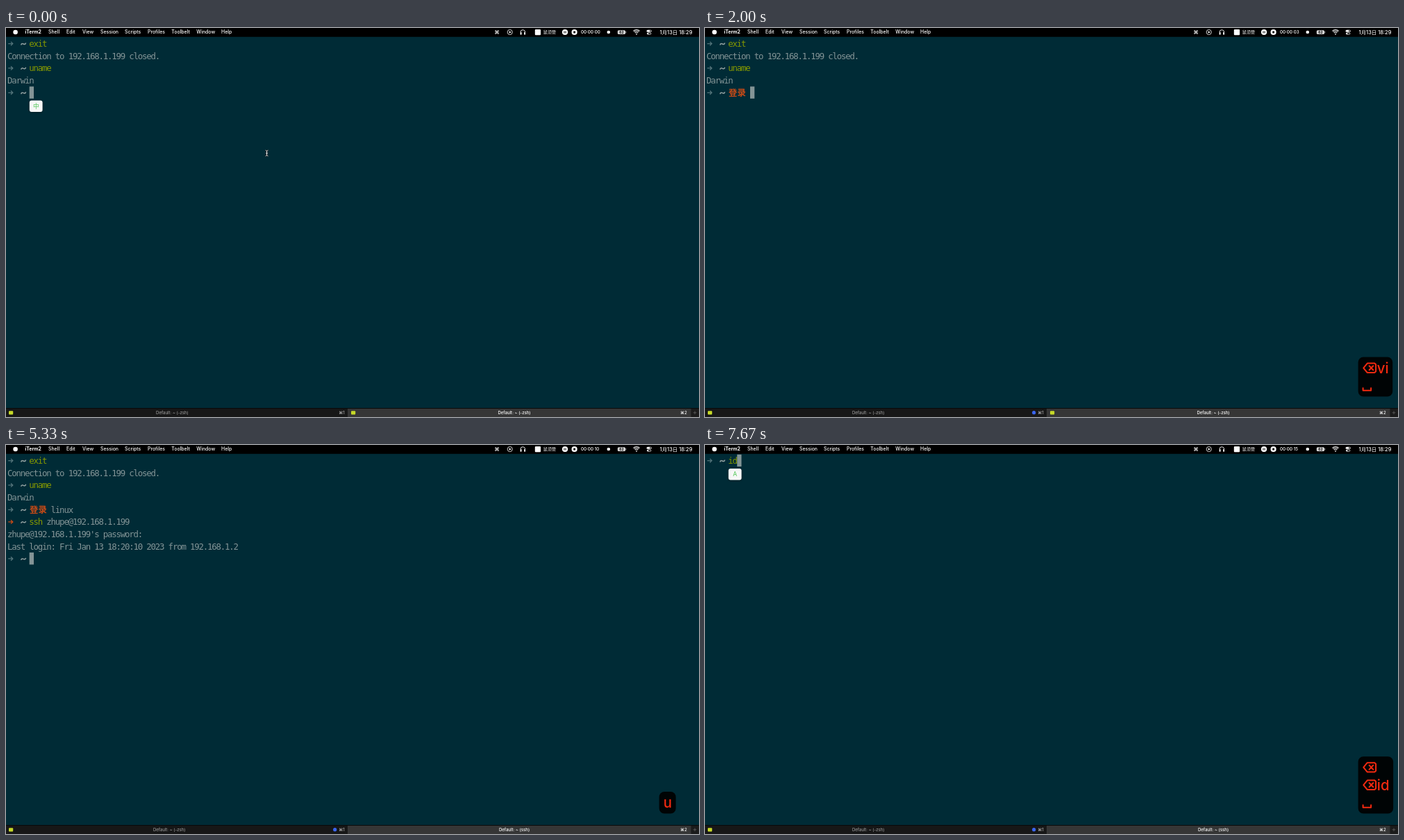
Recreate the animation shown at these times as an HTML page with a canvas. Size 998x561 px, loop 8 s.

```html
<!DOCTYPE html>
<html lang="en">
<head>
<meta charset="utf-8">
<title>Terminal session</title>
<style>
html, body { margin: 0; width: 100%; height: 100%; overflow: hidden; background: #002b36; }
canvas { display: block; width: 998px; height: 561px; }
</style>
</head>
<body>
<canvas id="stage"></canvas>
<script>
const W = 998, H = 561, LOOP = 8000;
const canvas = document.getElementById('stage');
const ctx = canvas.getContext('2d');
const dpr = window.devicePixelRatio || 1;
canvas.width = W * dpr;
canvas.height = H * dpr;

const UI = 'Inter, "Noto Sans CJK SC", "Noto Sans CJK", "DejaVu Sans", sans-serif';
const MONO = '"DejaVu Sans Mono", "Noto Sans CJK SC", "Noto Sans CJK", monospace';
const CELL = 6.26, LEFT = 2.6, TOP = 13.4, ROW = 17.67;
const FG = '#839496', GREEN = '#859900', ORANGE = '#cb4b16', DIM = '#54757b', RED = '#f52a10';

// ---- Session content: spans are [column, text, colour, weight, underline]
const out = text => [[0, text, FG]];
const prompt = (...spans) => [[0, '➜', DIM], [3, '~', '#93a1a1'], ...spans];
const failed = (...spans) => [[0, '➜', ORANGE], [3, '~', '#93a1a1'], ...spans];
const cmd = text => [5, text, GREEN];
const preedit = text => [5, text, FG, 400, true];
const bad = text => [5, text, ORANGE, 700];

const USER = 'zhupe@192.168.1.199';
const history = [prompt(cmd('exit')), out('Connection to 192.168.1.199 closed.'), prompt(cmd('uname')), out('Darwin')];
const login = [...history, prompt(bad('登录'), [10, 'linux', FG])];
const ssh = [...login, failed(cmd('ssh'), [9, USER, FG])];
const asked = [...ssh, out(USER + "'s password:")];
const welcome = [...asked, out('Last login: Fri Jan 13 18:20:10 2023 from 192.168.1.2')];

// Each entry changes the state from its step on; cursor is [column, row].
const script = [
  [0, { rows: [...history, prompt()], cursor: [5, 4], ime: ['中', 104.5], mouse: true, keys: [], fade: 1, title: '~ (-zsh)', icon: true }],
  [1, { rows: [...history, prompt(preedit('w'))], cursor: [6, 4], ime: null, mouse: false, keys: ['w'] }],
  [2, { rows: [...history, prompt([5, '从小', ORANGE])], cursor: [9, 4], keys: ['wig', '␣', '⌫', '⌫', '⌫'] }],
  [3, { rows: [...history, prompt()], cursor: [5, 4], keys: ['wig', '␣', '⌫', '⌫', '⌫', '⌫'], dot: true }],
  [4, { rows: [...history, prompt(preedit('wg'))], cursor: [7, 4], keys: ['wg'] }],
  [5, { keys: ['wg', '⌫'] }],
  [6, { rows: [...history, prompt(bad('登录'))], cursor: [10, 4], keys: ['⌫vi', '␣'] }],
  [7, { rows: [...history, prompt(bad('登录'), [10, 'li', FG])], cursor: [12, 4], keys: ['li'] }],
  [8, { rows: login, cursor: [15, 4], keys: ['li', 'nux'] }],
  [9, { rows: [...login, failed()], cursor: [5, 5], keys: ['li', 'nux', '↵'] }],
  [10, { rows: ssh, cursor: [28, 5], keys: ['nux', '↵'] }],
  [11, { cursor: [0, 6], keys: ['↵'], title: USER + ' (-zsh)' }],
  [12, { rows: asked, cursor: [32, 6], secret: true, fade: .5 }],
  [13, { keys: [], fade: 1, title: USER + ' (ssh)', icon: false }],
  [14, { rows: welcome, cursor: [0, 8], secret: false }],
  [15, { rows: [...welcome, prompt()], cursor: [5, 8], title: '~ (ssh)' }],
  [16, { keys: ['u'] }],
  [17, { rows: [...welcome, prompt(cmd('uname')), out('Linux'), prompt()], cursor: [5, 10], keys: ['una', 'me', '↵'] }],
  [18, { fade: .5 }],
  [19, { rows: [prompt()], cursor: [5, 0], keys: ['⌘K'], fade: 1, menu: 'Edit' }],
  [20, { ime: ['中', 34], fade: .45, menu: '' }],
  [21, { fade: .3 }],
  [22, { rows: [prompt(preedit('jd'))], cursor: [7, 0], ime: null, keys: ['jd'], fade: 1 }],
  [23, { rows: [prompt(cmd('id'))], cursor: [7, 0], ime: ['A', 34], keys: ['⌫', '⌫id', '␣'] }]
];
const clockSteps = [2, 4, 5, 7, 8, 10, 11, 13, 14, 16, 17, 19, 20, 22, 23];

// ---- Drawing helpers
function text(str, x, y, size, { color = '#fff', weight = 400, align = 'left', font = UI, base = 'middle' } = {}) {
  ctx.font = `${weight} ${size}px ${font}`;
  ctx.fillStyle = color;
  ctx.textAlign = align;
  ctx.textBaseline = base;
  ctx.fillText(str, x, y);
}

function rect(x, y, w, h, color, r = 0) {
  ctx.fillStyle = color;
  ctx.beginPath();
  ctx.roundRect(x, y, w, h, r);
  ctx.fill();
}

function disc(x, y, r, color) {
  ctx.fillStyle = color;
  ctx.beginPath();
  ctx.arc(x, y, r, 0, 7);
  ctx.fill();
}

function line(color, width, ...paths) {
  ctx.strokeStyle = color;
  ctx.lineWidth = width;
  ctx.beginPath();
  for (const p of paths) {
    for (let i = 0; i < p.length; i += 2) i ? ctx.lineTo(p[i], p[i + 1]) : ctx.moveTo(p[0], p[1]);
  }
  ctx.stroke();
}

function arc(x, y, r, from, to, color, width) {
  ctx.strokeStyle = color;
  ctx.lineWidth = width;
  ctx.beginPath();
  ctx.arc(x, y, r, from, to);
  ctx.stroke();
}

function at(x, y, scale, draw) {
  ctx.save();
  ctx.translate(x, y);
  ctx.scale(scale, scale);
  ctx.lineCap = ctx.lineJoin = 'round';
  draw();
  ctx.restore();
}

function commandKey(color, width) {
  const a = 3, r = 2.7, e = a + r;
  ctx.save();
  ctx.strokeStyle = color;
  ctx.lineWidth = width;
  for (let i = 0; i < 4; i++) {
    ctx.beginPath();
    ctx.moveTo(a, -e);
    ctx.lineTo(a, e);
    ctx.arc(e, e, r, Math.PI, -Math.PI / 2, true);
    ctx.stroke();
    ctx.rotate(Math.PI / 2);
  }
  ctx.restore();
}

// Key symbols, drawn around the middle of a 21px wide box.
const symbols = {
  '⌫': () => line(RED, 2, [-9, 0, -3.5, -6.7, 7, -6.7, 8.8, -5, 8.8, 5, 7, 6.7, -3.5, 6.7, -9, 0],
    [-.7, -3, 5, 3], [5, -3, -.7, 3]),
  '↵': () => {
    line(RED, 2, [-8.5, .8, 5, .8], [-4.5, -3.2, -8.5, .8, -4.5, 4.8]);
    arc(5, -2.9, 3.7, -Math.PI / 2, Math.PI / 2, RED, 2);
    line(RED, 2, [5, -6.6, 3.5, -6.6]);
  },
  '␣': () => line(RED, 2, [-9.7, 3.5, -9.7, 7, 1.8, 7, 1.8, 3.5]),
  '⌘': () => commandKey(RED, 1.8)
};

const KEY_SIZE = 20.4, KEY_WEIGHT = 500;

function keyWidth(ch) {
  if (symbols[ch]) return 21;
  ctx.font = `${KEY_WEIGHT} ${KEY_SIZE}px ${UI}`;
  return ctx.measureText(ch).width;
}

function drawKeys({ keys, fade }) {
  if (!keys.length) return;
  const pitch = 25.4, bottom = 531.4;
  const widths = keys.map(row => [...row].reduce((sum, ch) => sum + keyWidth(ch), 0));
  const h = keys.length * pitch + 6;
  ctx.globalAlpha = fade;
  rect(940.6, bottom - h, Math.max(...widths) + 11.8, h, 'rgba(0,0,0,.9)', 7.5);
  keys.forEach((row, i) => {
    let x = 946.8;
    const y = bottom - 15.7 - (keys.length - 1 - i) * pitch;
    for (const ch of row) {
      const w = keyWidth(ch);
      if (symbols[ch]) at(x + w / 2, y, 1, symbols[ch]);
      else text(ch, x, y + 7.5, KEY_SIZE, { color: RED, weight: KEY_WEIGHT, base: 'alphabetic' });
      x += w;
    }
  });
  ctx.globalAlpha = 1;
}

// ---- Terminal
function drawTilde(x, y, color) {
  ctx.strokeStyle = color;
  ctx.lineWidth = 1.5;
  ctx.beginPath();
  ctx.moveTo(x, y + 1.5);
  ctx.bezierCurveTo(x + 1.6, y - 3.8, x + 5.4, y + 3.8, x + 7, y - 1.5);
  ctx.stroke();
}

function drawSpan([col, str, color, weight = 400, underline], row) {
  const top = TOP + row * ROW, start = col;
  for (const ch of str) {
    const cells = ch > '⺀' ? 2 : 1, x = LEFT + (col + cells / 2) * CELL;
    if (ch === '➜') {
      const y = top + 9.2;
      line(color, 1.3, [3.2, y, 9.6, y], [7, y - 2.7, 9.8, y, 7, y + 2.7]);
    } else if (ch === '~') {
      drawTilde(x - 2.9, top + 9.6, color);
    } else {
      text(ch, x, top + 13.6, 12.4, { color, weight, align: 'center', font: MONO, base: 'alphabetic' });
    }
    col += cells;
  }
  if (underline) rect(LEFT + start * CELL, top + 15.5, (col - start) * CELL, 1, color);
}

function drawTerminal({ rows, cursor, secret, ime, mouse }) {
  rows.forEach((spans, row) => spans.forEach(span => drawSpan(span, row)));
  const x = LEFT + cursor[0] * CELL, y = TOP + cursor[1] * ROW;
  if (secret) {
    arc(x + 2.7, y + 4.2, 2.1, 0, 7, '#fff', 1.5);
    line('#fff', 1.6, [x + 2.9, y + 6.2, x + 2.9, y + 16.2], [x + 3, y + 11.6, x + 5.2, y + 11.6], [x + 3, y + 14.6, x + 5.2, y + 14.6]);
  } else {
    rect(x - .2, y + .3, 6.3, ROW - .3, FG);
  }
  if (ime) {
    ctx.save();
    ctx.shadowColor = 'rgba(0,0,0,.35)';
    ctx.shadowBlur = 3;
    ctx.shadowOffsetY = 1;
    rect(33.8, ime[1], 18.8, 16.6, '#f7f7f7', 3);
    ctx.restore();
    text(ime[0], 43.2, ime[1] + 8.6, 8.6, { color: '#4cc552', align: 'center' });
  }
  if (mouse) {
    const beam = [[373.8, 176.3, 375.6, 177.4, 377.4, 176.3], [375.6, 177.4, 375.6, 183.6],
      [373.8, 184.7, 375.6, 183.6, 377.4, 184.7], [374.4, 180.5, 376.8, 180.5]];
    line('#111', 1.9, ...beam);
    line('#fff', .9, ...beam);
  }
}

// ---- Menu bar
const menus = [['Shell', 61], ['Edit', 87], ['View', 110], ['Session', 136], ['Scripts', 171],
  ['Profiles', 204], ['Toolbelt', 238.3], ['Window', 274.3], ['Help', 310]];

function drawMenuBar(menu, seconds) {
  const y = 6.3, white = '#fff';
  rect(0, 0, W, 12.7, '#000');
  disc(13.6, 6, 3.3, white);
  text('iTerm2', 27.4, y, 6.9, { weight: 700 });
  for (const [name, x] of menus) {
    if (name === menu) rect(x - 5, 0, 23, 12.5, 'rgba(255,255,255,.25)', 2);
    text(name, x, y, 6.9, { weight: 500 });
  }
  at(707, 6, .3, () => commandKey(white, 2.4));
  arc(725.7, 6, 3.6, 0, 7, white, .8);
  ctx.fillStyle = white;
  ctx.beginPath();
  ctx.moveTo(724.6, 4.2);
  ctx.lineTo(727.8, 6);
  ctx.lineTo(724.6, 7.8);
  ctx.fill();
  arc(744.3, 6, 3.3, Math.PI, 0, white, .9);
  rect(740.6, 6, 1.9, 3.8, white, .7);
  rect(746.1, 6, 1.9, 3.8, white, .7);
  rect(761.8, 2, 8.2, 8.2, white, 1);
  text('鼠须管', 773.8, y, 6.1, { weight: 500 });
  disc(805, 6, 4.1, white);
  rect(803.4, 4.4, 1, 3.2, '#000');
  rect(805.6, 4.4, 1, 3.2, '#000');
  disc(818.6, 6, 4.1, white);
  rect(817.2, 4.6, 2.8, 2.8, '#000', .4);
  text('00:00:' + String(seconds).padStart(2, '0'), 828, y, 6.2, { weight: 500 });
  disc(867.8, 6, 2.3, white);
  rect(880.8, 3.2, 11.2, 5.8, '#d8d8d8', 1.5);
  rect(892.4, 5, .9, 2.2, '#aaa', .4);
  text('62', 886.4, 6.3, 5, { color: '#000', weight: 700, align: 'center' });
  for (const r of [2.8, 4.8, 6.5]) arc(908, 9, r, -2.35, -.79, white, 1.1);
  disc(908, 8.8, .9, white);
  rect(922.6, 2.7, 7, 3, white, 1.5);
  disc(927.9, 4.2, .9, '#000');
  line(white, .7, [924, 6.9, 928.2, 6.9, 929.2, 8, 928.2, 9.2, 924, 9.2, 923, 8, 924, 6.9]);
  disc(924.4, 8, .9, white);
  text('1月13日 18:29', 988.3, y, 7.4, { weight: 500, align: 'right' });
}

// ---- Tab bar
function drawTabs({ title, dot, icon }) {
  const y = 554.9;
  rect(0, 548, W, 13, '#171717');
  rect(0, 548, W, .8, '#050505');
  rect(492, 549, 494.5, 12, '#363636');
  rect(987, 549, 11, 12, '#1b1b1b');
  for (const x of icon ? [4, 497] : [4]) rect(x, 552.2, 6.2, 5.2, '#c6d928', 1);
  const grey = { color: '#aaa', weight: 400, align: 'center' };
  const bright = { color: '#fff', weight: 500, align: 'center' };
  text('Default: ~ (-zsh)', dot ? 235.2 : 239.4, y, 6, grey);
  text('⌘1', 483.4, y, 6, { ...grey, color: '#ccc' });
  if (dot) disc(473.7, 554.7, 2.6, '#3b66f0');
  text('Default: ' + title, 732, y, 6, bright);
  text('⌘2', 975.8, y, 6, bright);
  line('#777', .6, [989.6, 554.8, 994.4, 554.8], [992, 552.4, 992, 557.2]);
}

// ---- Playback
const stepStart = k => Math.round(k * 100 / 3) * 10;

function render(t) {
  let step = Math.min(23, Math.ceil(t * 3 / 1000));
  while (stepStart(step) > t) step--;
  const state = Object.assign({}, ...script.filter(([k]) => k <= step).map(([, change]) => change));
  const seconds = clockSteps.filter(k => k <= step).length;

  ctx.setTransform(dpr, 0, 0, dpr, 0, 0);
  rect(0, 0, W, H, '#002b36');
  drawTerminal(state);
  drawKeys(state);
  drawMenuBar(state.menu, seconds);
  drawTabs(state);
}

const start = performance.now();
function tick() {
  render((performance.now() - start) % LOOP);
  requestAnimationFrame(tick);
}
tick();
</script>
</body>
</html>
```
